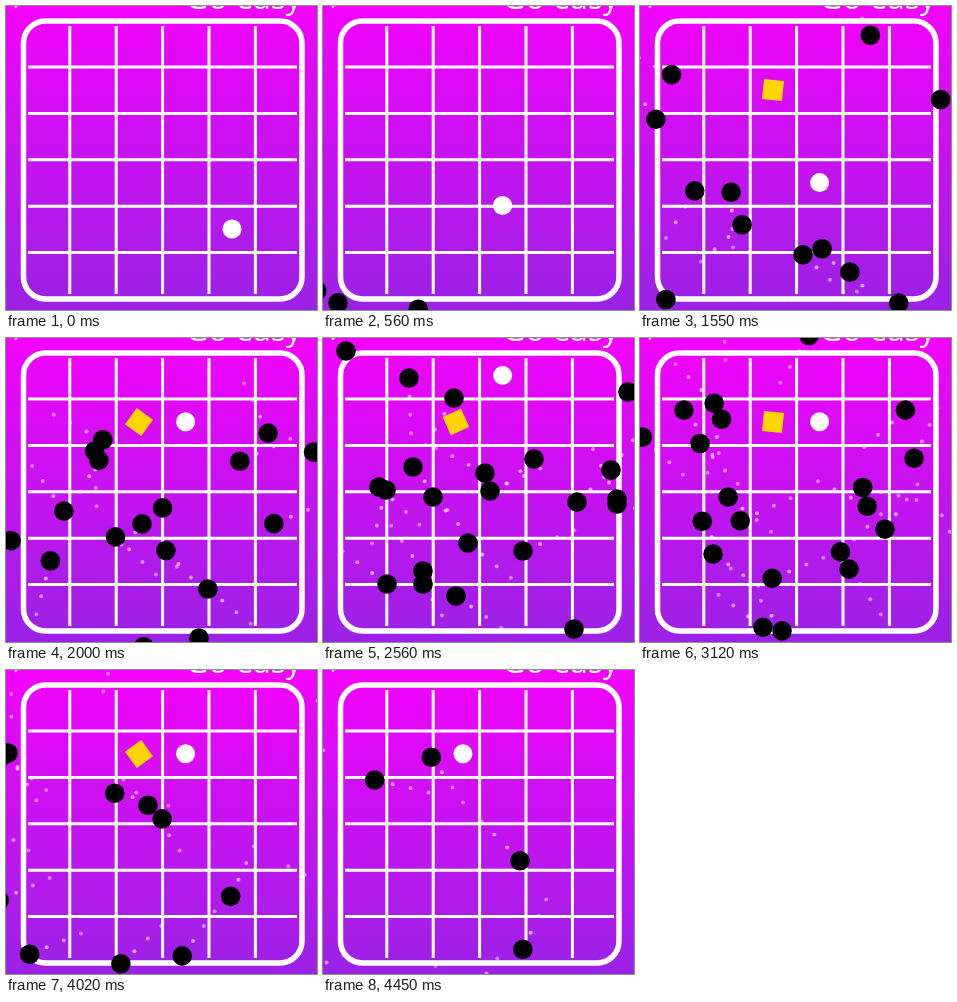
An HTML page with a canvas for the animation above (4.57 s loop, 311 by 304 pixels).

```html
<!DOCTYPE html>
<html lang="en">
<head>
<meta charset="utf-8">
<title>Grid dodge</title>
<style>
html, body { margin: 0; width: 100%; height: 100%; overflow: hidden; }
body { position: relative; background: linear-gradient(#f302fc, #9a22e5); }
svg, canvas { position: absolute; left: 0; top: 0; width: 311px; height: 304px; }
text { font: 500 31.5px "Open Sans", "Noto Sans", sans-serif; fill: #fff; }
</style>
</head>
<body>
<svg viewBox="0 0 311 304" fill="none" stroke="#fff">
  <text x="179.5" y="3" stroke="none">Go easy</text>
  <path d="M9 1.5L11 0" stroke-width="2"/>
  <rect x="17.5" y="15" width="278.5" height="278" rx="22" stroke-width="5.5"/>
  <path id="grid" stroke-width="3"/>
</svg>
<canvas id="stage"></canvas>
<script>
const W = 311, H = 304;
const LOOP = 4570, STEP_MS = 111, LAST_STEP = 40;
const CELL = 46.4, SPEED = 14.63, TRAIL_GAP = 18.4, TRAIL_DOTS = 3;
const MEET_STEP = 23;

// Volleys: headings fan out evenly in degrees; each ball passes its point at MEET_STEP
const VOLLEYS = [
  { from: -145, gap: 4, via: [[133, 258], [145, 205], [56, 149], [110, 159], [90, 129], [251, 291], [100, 246]] },
  { from: -92, gap: 16.7, via: [[86, 40], [63, 152], [131, 60], [211, 121]] },
  { from: 27, gap: 9.3, via: [[162, 135], [64, 246], [23, 13], [100, 233], [294, 161]] },
  { from: 115, gap: 11, via: [[305, 54], [288, 132], [254, 164]] },
  { from: 156, gap: 2, via: [[167, 153], [200, 213]] },
  { from: 193, gap: 0, via: [[294, 166]] }
];
const rad = deg => deg * Math.PI / 180;
const balls = VOLLEYS.flatMap(({ from, gap, via }) => via.map(([x, y], i) => {
  const angle = rad(from + i * gap);
  return { x, y, ux: Math.cos(angle), uy: Math.sin(angle) };
}));

// Steps at which the player starts to move by one cell
const START = { x: 226, y: 223 };
const MOVES = { left: [1, 38], up: [4, 13, 15, 19], down: [24] };
const GOLD = { x: 133, y: 84, size: 20, from: 12, to: 40, spin: 6 };

let lines = "";
for (let i = 0; i < 5; i++) {
  lines += `M${63.8 + i * CELL} 20V288M22 ${61 + i * CELL}H291`;
}
document.getElementById("grid").setAttribute("d", lines);

const canvas = document.getElementById("stage");
const ctx = canvas.getContext("2d");
const scale = window.devicePixelRatio || 1;
canvas.width = W * scale;
canvas.height = H * scale;
ctx.scale(scale, scale);

function dot(x, y, r, color) {
  ctx.fillStyle = color;
  ctx.beginPath();
  ctx.arc(x, y, r, 0, Math.PI * 2);
  ctx.fill();
}

// Cells covered so far, each move easing out over three steps
function moved(starts, step) {
  return starts.reduce((sum, start) => {
    const p = Math.max(0, Math.min(1, (step - start) / 3));
    return sum + 1 - (1 - p) ** 1.75;
  }, 0);
}

function drawPlayer(step) {
  const cols = -moved(MOVES.left, step);
  const rows = moved(MOVES.down, step) - moved(MOVES.up, step);
  dot(START.x + cols * CELL, START.y + rows * CELL, 9.5, "#fff");
}

function drawGold(step) {
  if (step < GOLD.from || step >= GOLD.to) return;
  ctx.save();
  ctx.translate(GOLD.x, GOLD.y);
  ctx.rotate(rad(GOLD.spin * (step - GOLD.from)));
  ctx.fillStyle = "#ffd500";
  ctx.fillRect(-GOLD.size / 2, -GOLD.size / 2, GOLD.size, GOLD.size);
  ctx.restore();
}

function drawBall(ball, way, r, color) {
  dot(ball.x + ball.ux * way, ball.y + ball.uy * way, r, color);
}

function draw(step) {
  ctx.clearRect(0, 0, W, H);
  const way = SPEED * (step - MEET_STEP);
  for (const ball of balls) {
    for (let k = 1; k <= TRAIL_DOTS; k++) {
      drawBall(ball, way - k * TRAIL_GAP, 2, `rgba(255,255,255,${0.65 - k * 0.07})`);
    }
  }
  drawGold(step);
  drawPlayer(step);
  for (const ball of balls) drawBall(ball, way, 9.8, "#000");
}

const origin = performance.now();
let shown = -1;
function tick() {
  const t = (performance.now() - origin) % LOOP;
  const step = Math.min(LAST_STEP, Math.floor(t / STEP_MS));
  if (step !== shown) draw(shown = step);
  requestAnimationFrame(tick);
}
tick();
</script>
</body>
</html>
```
